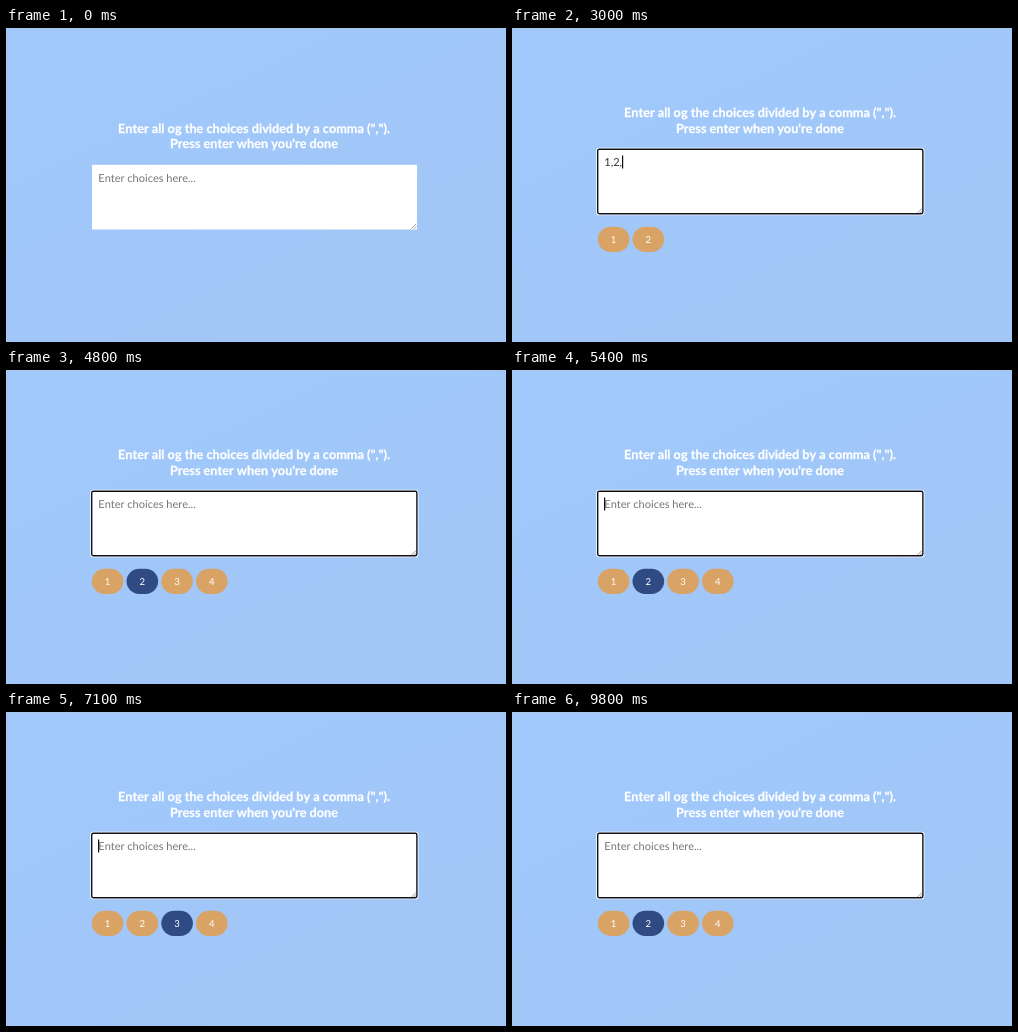
Write an HTML page that moves like this. It is 500 px wide and 314 px high and loops after 9.9 s.

```html
<!DOCTYPE html>
<html lang="en">
<head>
<meta charset="utf-8">
<title>Random choice picker</title>
<style>
  html, body { margin: 0; width: 100%; height: 100%; overflow: hidden; }
  body { background: linear-gradient(155deg, #a0c8fb 25%, #a2c6f6 75%); }
  svg { display: block; width: 100vw; height: 100vh; font-family: Lato, sans-serif; font-kerning: none; text-rendering: geometricPrecision; }
  .heading { font-size: 12.7px; font-weight: 700; fill: #fff; stroke: #fff; stroke-width: .25; text-anchor: middle; }
  .entry { font-size: 11px; fill: #333; }
  .hint { fill: #757575; }
  .tag text { font-size: 9.6px; fill: #fff; text-anchor: middle; }
</style>
</head>
<body>
<svg viewBox="0 0 500 314">
  <path d="M.5 314V.5H500" fill="none" stroke="#a9c8e9"/>
  <g id="page">
    <text class="heading" x="248" y="89.3">Enter all og the choices divided by a comma (",").</text>
    <text class="heading" x="248" y="104.9">Press enter when you're done</text>
    <rect x="86" y="121.3" width="325" height="64.7" fill="#fff"/>
    <g id="focus" fill="none">
      <rect x="84.9" y="120.4" width="326.8" height="66.2" rx="2.4" stroke="#fff" stroke-width="1.4"/>
      <rect x="85.7" y="121.3" width="325.2" height="64.4" rx="1.6" stroke="#101018" stroke-width="1.4"/>
    </g>
    <path d="M405.3 185.2l4.9-4.9M408 185.2l2.2-2.2" stroke="#777" stroke-width=".7"/>
    <text id="hint" class="entry hint" x="92.3" y="138">Enter choices here...</text>
    <text id="typed" class="entry" x="92.3" y="138"></text>
    <rect id="caret" y="127.5" width="1.2" height="13" fill="#111"/>
    <g id="tags"></g>
  </g>
</svg>
<script>
const LOOP = 9900, FOCUS = 400, SUBMIT = 4000, PICK_START = 4200;
const ENTRY = "1,2,3,4";
const KEY_TIMES = [1000, 2300, 2600, 3000, 3300, 3500, 3700];
// Caret flips at each of these times, beginning hidden.
const CARET_FLIPS = [400, 1500, 2100, 4700, 5200, 5700, 6200, 6700, 7100, 7700, 8300, 8700, 9200, 9800];
// Highlighted tag per 100 ms step (0 = none); the last one is the final pick.
const PICKS = "32413124113324132400311423142332";

const el = id => document.getElementById(id);
const countPast = (times, t) => times.filter(time => time <= t).length;
const show = (node, visible) => node.setAttribute("visibility", visible ? "visible" : "hidden");

el("tags").innerHTML = ENTRY.split(",").map((label, i) => `
  <g class="tag" transform="translate(${85.8 + i * 34.75} 198.7)">
    <rect width="31.6" height="25.2" rx="12.6"/>
    <text x="15.8" y="16">${label}</text>
  </g>`).join("");
const tags = [...document.querySelectorAll(".tag")];

function draw(t) {
  const keys = countPast(KEY_TIMES, t);
  const text = t < SUBMIT ? ENTRY.slice(0, keys) : "";
  const tagCount = Math.ceil(keys / 2);
  const step = Math.floor((t - PICK_START) / 100);
  const picked = step < 0 ? 0 : +PICKS[Math.min(step, PICKS.length - 1)];

  el("page").setAttribute("transform", `translate(0 ${keys ? 0 : 15.5})`);
  el("typed").textContent = text;
  show(el("hint"), !text);
  show(el("focus"), t >= FOCUS);
  show(el("caret"), countPast(CARET_FLIPS, t) % 2);
  const textWidth = text ? el("typed").getComputedTextLength() : 0;
  el("caret").setAttribute("x", Math.round(91.9 + textWidth));
  tags.forEach((tag, i) => {
    show(tag, i < tagCount);
    tag.firstElementChild.setAttribute("fill", i + 1 === picked ? "#304a84" : "#d9a365");
  });
}

function frame() {
  draw(performance.now() % LOOP);
  requestAnimationFrame(frame);
}
frame();
</script>
</body>
</html>
```
